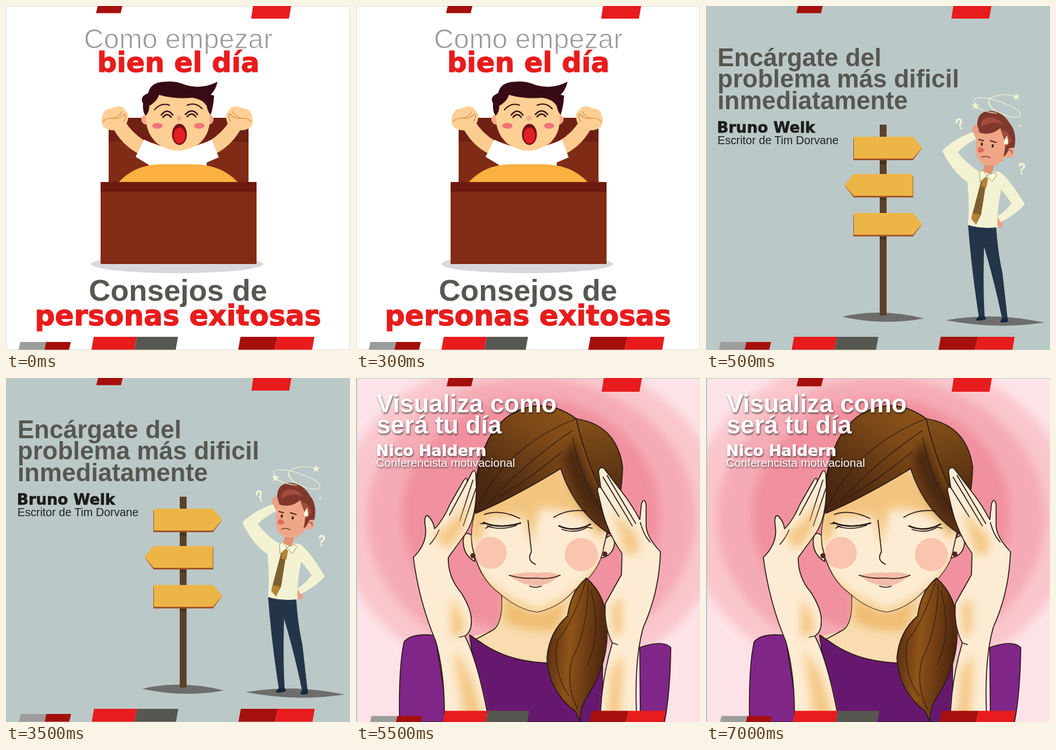
An HTML page for the animation above (8 s loop, 600x600 px).

```html
<!DOCTYPE html>
<html lang="es">
<head>
<meta charset="utf-8">
<title>Como empezar bien el día</title>
<style>
  html, body { margin: 0; width: 100%; height: 100%; overflow: hidden; }
  svg { display: block; width: 100vw; height: 100vh; }
  .scene { visibility: hidden; }
  .scene.on { visibility: visible; }
  text { font-family: "Liberation Sans", Arial, sans-serif; }
  .bold { font-weight: 700; font-size: 43.6px; }
  .black { font-family: "DejaVu Sans", sans-serif; font-weight: 700; stroke-width: .025em; }
  .mid { text-anchor: middle; }
  .line { fill: none; stroke-linecap: round; stroke-linejoin: round; }
  .ink { stroke: #2b1a16; stroke-width: 1.7; stroke-linejoin: round; stroke-linecap: round; }
  .shade { filter: drop-shadow(1px 2px 1.5px #0009); }
  .soft { filter: blur(8px); }
</style>
</head>
<body>
<svg viewBox="0 0 600 600">
  <defs>
    <g id="topTabs">
      <path fill="#a50f0c" d="M161-4H204L200 12.5H157Z"/>
      <path fill="#e81c1c" d="M431.5-4H498L493.500 22H427.500Z"/>
    </g>
    <g id="bottomTabs">
      <path fill="#9d9d9c" d="M25 586H70L67 599.500H22Z"/>
      <path fill="#a50f0c" d="M70 586H113L110 599.500H67Z"/>
      <path fill="#e81c1c" d="M153 577H228L224 599.500H149Z"/>
      <path fill="#575751" d="M228 577H300L296 599.500H224Z"/>
      <path fill="#a50f0c" d="M409 577H474L468 599.500H405Z"/>
      <path fill="#e81c1c" d="M474 577H538L534 599.500H468Z"/>
    </g>
    <g id="arrow">
      <path fill="#a4552b" d="M257 3H360L376 21 361 41H257Z"/>
      <path fill="#edb546" d="M258 0H361L377 19 361 38H258Z"/>
    </g>
    <path id="star" d="M0-7 1.700-2 7-2 2.700 1.200 4.300 6.500 0 3.400-4.300 6.500-2.700 1.200-7-2-1.700-2Z"/>
    <linearGradient id="bangs" x1=".9" y1="0" x2=".1" y2="1">
      <stop offset="0" stop-color="#93591b"/><stop offset=".35" stop-color="#7d4916"/><stop offset=".75" stop-color="#4d2a12"/><stop offset="1" stop-color="#432312"/>
    </linearGradient>
    <linearGradient id="crown" x2=".4" y2="1">
      <stop offset="0" stop-color="#8f581b"/><stop offset=".4" stop-color="#804d18"/><stop offset="1" stop-color="#48280f"/>
    </linearGradient>
    <linearGradient id="tail" x2="1" y2=".2">
      <stop offset="0" stop-color="#4c260f"/><stop offset=".45" stop-color="#8f5418"/><stop offset="1" stop-color="#4e260f"/>
    </linearGradient>
    <clipPath id="photo"><path d="M2 1H600V600H2Z"/></clipPath>
    <clipPath id="face"><path d="M213 218Q197 264 203 295Q215 350 250 375Q283 404 316 408Q353 401 381 370Q426 338 432 295L440 260 357 145Z"/></clipPath>
  </defs>

  <!-- Waking up -->
  <g class="scene">
    <path fill="#fff" stroke="#dcdcdc" d="M.5.5H599.500V599.500H.5Z"/>
    <use href="#topTabs"/><use href="#bottomTabs"/>
    <text class="mid" x="300.500" y="74" font-size="48.200" fill="#999" stroke="#fff" stroke-width="1.100">Como empezar</text>
    <text class="mid black" x="300.500" y="115" font-size="48" fill="#e81c1c" stroke="#e81c1c">bien el día</text>

    <ellipse cx="298.500" cy="450" rx="150" ry="16" fill="#d8d8dc"/>
    <path fill="#802b15" d="M179 195H423V307H179Z"/>
    <path fill="#702013" d="M179 195H423V237H179Z"/>
    <g id="arm">
      <path fill="#fccb90" d="M186 212 207 200Q219 221 242 235L230 257Q202 242 186 212Z"/>
      <path fill="#fdcf94" d="M171 185Q174 179 182 179L195 175Q205 175 207 181Q215 187 213 196Q211 211 195 216Q180 219 170 211Q163 199 171 185Z"/>
      <path class="line" stroke="#d99252" stroke-width="1.300" d="M169 202Q176 194 187 196T207 188M187 196Q198 192 202 184M207 188Q211 194 205 201"/>
    </g>
    <use href="#arm" transform="matrix(-1 0 0 1 597 0)"/>
    <path fill="#fff" d="M241 233Q300 262 359 233L371 264 350 273V290H249V277L226 263Z"/>
    <path fill="#fbb040" d="M197 307Q225 276 272 276H326Q375 276 404 307Z"/>
    <circle cx="245" cy="198" r="9" fill="#f6a987"/><circle cx="353" cy="198" r="9" fill="#f6a987"/>
    <path fill="#fdcf94" d="M244 190Q244 145 300 144T355 190Q358 222 337 240Q300 265 264 240Q243 222 244 190Z"/>
    <path fill="#380b14" d="M244 191Q238 187 239 170Q232 158 248 152Q252 132 279 132Q294 130 314 138Q342 146 369 132Q366 146 357 155L363 156Q362 174 357 190Q352 185 350 174Q342 162 325 160Q295 163 267 155Q263 167 250 174Q250 185 244 191Z"/>
    <g class="line" stroke="#380b14">
      <path stroke-width="2" d="M259 181Q270 168 285 173M316 173Q331 167 342 179"/>
      <path stroke-width="2.600" d="M271 190Q281 177 291 190M274 194Q281 185 288 194M313 189Q324 177 334 189M316 193Q324 184 331 193"/>
    </g>
    <circle cx="302" cy="196" r="4" fill="#f6a987"/>
    <ellipse cx="264" cy="209" rx="9" ry="5" fill="#f1737a"/><ellipse cx="337" cy="209" rx="9" ry="5" fill="#f1737a"/>
    <ellipse cx="302.500" cy="224" rx="13" ry="18.500" fill="#74121c"/>
    <ellipse cx="302.500" cy="226" rx="10" ry="14" fill="#e11f25"/>
    <path fill="#832b15" d="M165 307H437V450H165Z"/>
    <path fill="#6d1b10" d="M165 307H437V324H165Z"/>

    <text class="mid" x="300" y="514" font-size="52.300" font-weight="700" fill="#575751">Consejos de</text>
    <text class="mid black" x="300" y="557" font-size="49" fill="#e81c1c" stroke="#e81c1c">personas exitosas</text>
  </g>

  <!-- Hard problem first -->
  <g class="scene">
    <path fill="#bbc8c8" d="M0 0H600V600H0Z"/>
    <use href="#topTabs" x=".5"/><use href="#bottomTabs" x=".5"/>
    <g class="bold" fill="#575751">
      <text x="20" y="105">Encárgate del</text>
      <text x="20" y="142">problema más dificil</text>
      <text x="20" y="180">inmediatamente</text>
    </g>
    <text class="black" x="19" y="221" font-size="26.500" fill="#1d1d1b" stroke="#1d1d1b">Bruno Welk</text>
    <text x="20" y="241" font-size="19.700" fill="#222">Escritor de Tim Dorvane</text>

    <path fill="#6d6e6c" d="M238 542Q305 526 380 545Q310 558 238 542ZM418 548Q500 533 590 552Q510 565 418 548Z"/>
    <path fill="#5b4128" d="M303 207H315V540H303Z"/>
    <path fill="#493320" d="M303 269H315V276H303ZM303 333H315V339H303ZM303 401H315V407H303Z"/>
    <use href="#arrow" y="228"/>
    <use href="#arrow" transform="matrix(-1 0 0 1 618.500 293)"/>
    <use href="#arrow" y="361"/>

    <path fill="#253549" d="M457 381 506 384Q509 430 517 465L526 545 517 548Q503 480 485 420Q483 490 486 542L476 543Q463 460 457 381Z"/>
    <path fill="#18263b" d="M476 541H486L489 546Q480 550 470 548ZM516 545 526 543 527 550Q520 554 513 551Z"/>
    <path fill="#e8a183" d="M465 227Q461 208 472 206L481 215 473 231ZM503 367Q513 365 517 373L518 385 511 387Z"/>
    <path fill="#f3f2d2" d="M466 220 471 232Q450 243 439 255Q455 275 475 288L512 289Q530 302 556 346Q540 364 514 377L508 367Q524 357 533 344L515 320Q508 350 508 386Q480 389 457 382Q460 345 456 307Q430 290 412 252Q435 230 466 220Z"/>
    <path fill="#e48f72" d="M487 270 503 276 498 295 484 288Z"/>
    <path fill="#efa686" d="M477 214Q469 235 471 255Q473 274 490 278Q512 280 523 263Q536 268 538 254Q538 246 530 247L533 220 500 208Z"/>
    <path fill="#81382c" d="M473 207Q473 185 493 183Q517 182 530 205Q543 220 538 247L529 248Q524 261 519 262Q523 243 523 230L513 213Q498 227 477 221Z"/>
    <path fill="#a24c3b" d="M480 202Q497 184 520 207Q500 198 480 211ZM514 217Q528 216 533 236L525 245Z"/>
    <path fill="#fffbe4" d="M525 226Q517 239 521 241Q528 244 527 235Z"/>
    <path fill="#d96f5c" d="M475 247Q481 244 486 252Q481 258 474 254Z"/>
    <path class="line" stroke="#51251f" stroke-width="2" d="M476 233 484 235M496 235 506 238"/>
    <ellipse cx="481" cy="241" rx="1.800" ry="3" fill="#382522"/><ellipse cx="500" cy="244" rx="1.800" ry="3" fill="#382522"/>
    <path class="line" stroke="#7a3930" stroke-width="1.300" d="M480 264Q488 260 496 265M529 252Q534 251 534 257"/>
    <path fill="#7d602f" d="M482 297 490 299 480 363 471 381 463 369Z"/>
    <path fill="#b38337" d="M482 297 492 301 489 317 480 315ZM465 361 478 364 471 381 463 372Z"/>
    <path fill="#f8f7df" stroke="#a79857" d="M483 286 490 296 478 307 477 290ZM503 290 490 296 499 306 507 295Z"/>
    <g class="line" stroke="#f3f2d2">
      <path stroke-width="1.200" d="M470 174C458 158 480 156 510 166S553 186 546 192Q530 199 500 179Q485 164 504 157Q523 152 541 158M470 174Q482 185 507 187M504 157Q482 166 502 181"/>
      <path id="ask" stroke-width="3.500" d="M547 279C547 274 555 274 555 279C555 283 550 283 550 287M550 291.500V292"/>
    </g>
    <use href="#ask" class="line" stroke="#f3f2d2" transform="rotate(-22 443 206)translate(-108 -78)"/>
    <g fill="#f3f2d2">
      <use href="#star" x="470" y="174"/><use href="#star" x="541" y="158"/>
      <use href="#star" transform="translate(548 209)scale(.4)"/>
    </g>
  </g>

  <!-- Picture the day -->
  <g class="scene">
    <path fill="#bbc8c8" d="M0 0H600V600H0Z"/>
    <g clip-path="url(#photo)">
      <path fill="#fde3e8" d="M0 0H600V600H0Z"/>
      <g class="soft">
        <ellipse cx="305" cy="245" rx="338" ry="285" fill="#f9c6cc"/>
        <ellipse cx="305" cy="245" rx="286" ry="245" fill="#f5abb5"/>
        <ellipse cx="305" cy="240" rx="225" ry="205" fill="#f1919f"/>
      </g>

      <path class="ink" fill="url(#crown)" d="M208 250Q199 120 265 67Q325 28 384 71Q455 82 465 155Q464 220 437 276L320 210Z"/>
      <path fill="#f9dcb0" d="M254 360Q260 425 234 442L198 452 217 600H430V490L379 440 380 360Z"/>
      <path class="line ink" d="M254 378Q257 425 240 439L205 458"/>
      <path fill="#efbd72" class="soft" d="M256 376Q285 402 316 410L368 388 350 440Q300 445 258 425Z"/>
      <path class="ink" fill="#fce6c8" d="M207 279Q190 262 187 282Q186 308 207 320ZM430 285Q449 264 451 288Q449 309 428 314Z"/>
      <path class="ink" fill="#fdecd4" d="M213 218Q197 264 203 295Q215 350 250 375Q283 404 316 408Q353 401 381 370Q426 338 432 295L440 260 357 145Z"/>
      <g clip-path="url(#face)">
        <path class="soft" fill="#f2c57f" d="M200 225 350 150 400 215 440 260 425 285 400 245 360 230 320 228 306 290 293 240 230 244 215 285 200 290Z"/>
        <path class="soft" fill="#f6d193" d="M200 320Q235 372 316 402Q400 375 440 290V420H200Z"/>
      </g>
      <circle cx="235" cy="305" r="28" fill="#f9c5af"/><circle cx="393" cy="308" r="29" fill="#f9c5af"/>
      <path class="ink" fill="url(#bangs)" d="M384 71Q325 28 265 67Q205 110 209 236Q270 211 357 158Q381 232 442 272L448 240Q401 150 384 71Z"/>
      <path class="soft" fill="#4a2812" d="M362 140 382 105Q405 195 446 225L438 262Q388 228 362 140Z"/>
      <path class="line ink" opacity=".7" d="M384 71Q265 117 215 220M377 92Q290 151 235 215M360 128Q310 171 250 207M378 104Q393 188 442 249"/>
      <g class="line ink">
        <path d="M224 238Q250 228 286 245M345 243Q368 228 401 232"/>
        <path stroke-width="2.600" d="M222 252Q250 264 287 253M354 258Q381 270 409 255"/>
        <path d="M229 258Q252 267 280 257M359 264Q382 272 402 261M226 254 217 254M234 258 226 262M402 260 412 262M300 248 306 303Q297 318 313 325"/>
      </g>
      <path fill="#f5bda9" d="M267 344Q298 337 316 340Q337 336 356 344Q330 366 309 362Q286 360 267 344Z"/>
      <path class="line ink" d="M267 344Q290 351 314 349Q337 352 356 344M303 363Q313 367 323 363"/>
      <circle cx="204" cy="310" r="4.500" fill="#512324"/><circle cx="434" cy="307" r="4.500" fill="#512324"/>

      <g class="ink">
        <path fill="#812689" d="M76 600Q74 505 84 460Q98 444 138 449L162 600ZM496 600 495 470Q535 456 549 470Q548 550 538 600Z"/>
        <path fill="#66186f" d="M198 448 216 460Q262 494 334 497L430 500V600H220Z"/>
      </g>
      <path class="ink" fill="url(#tail)" d="M402 349Q375 371 369 415Q337 443 333 488Q335 545 383 582L391 600Q389 577 404 554Q440 500 438 437Q439 382 402 349Z"/>
      <path class="line ink" opacity=".65" d="M402 349Q382 420 351 459Q342 510 371 554M405 359Q404 440 377 490Q365 535 386 577M410 371Q430 445 403 500"/>

      <path class="ink" fill="#fdecd4" d="M154 600Q156 520 139 459Q110 390 100 313Q125 288 121 260Q118 239 125 240Q135 249 137 263Q152 248 164 220L187 180Q194 169 194 181L201 167Q206 156 209 167L210 194Q209 247 190 273L161 313Q160 347 183 374Q203 405 201 427Q201 443 190 450Q213 495 232 600Z"/>
      <path class="line ink" d="M194 181 163 239M204 178 181 249M209 193 187 258M180 452 190 450M145 265Q139 279 129 290"/>
      <path class="ink" fill="#fdecd4" d="M426 600Q427 530 447 462Q432 433 435 393L463 343 464 306Q441 274 430 233L421 196Q421 188 427 191L423 164Q424 154 432 157L464 199Q481 221 495 247L498 219Q503 207 506 221L506 258Q507 278 531 303Q529 373 501 435Q484 495 490 600Z"/>
      <path class="line ink" d="M427 191 459 242M431 173 482 258M438 170 488 254M447 462 456 465M496 252Q502 275 513 286"/>
      <g class="soft" fill="#f1bc6c" opacity=".75">
        <path d="M137 275Q174 248 197 210L185 270 158 300ZM165 385Q194 415 187 445L166 455ZM170 475Q207 510 222 600H190Z"/>
        <path d="M447 230 493 278 493 307 470 308ZM445 400 463 380 465 440 449 455ZM445 510 467 480 460 600H436Z"/>
      </g>
    </g>
    <use href="#topTabs" x="1" y="2"/><use href="#bottomTabs" x="2" y="3.500"/>
    <g class="shade" fill="#fff">
      <text class="bold" x="36" y="60">Visualiza como</text>
      <text class="bold" x="36" y="97">será tu día</text>
      <text class="black" x="35" y="136" font-size="26.500" stroke="#fff">Nico Haldern</text>
      <text x="35" y="154.500" font-size="20.200">Conferencista motivacional</text>
    </g>
  </g>
</svg>
<script>
  const LOOP = 8000;
  const starts = [0, 500, 5500];
  const scenes = document.querySelectorAll('.scene');

  function draw() {
    const time = performance.now() % LOOP;
    const current = starts.findLastIndex(start => time >= start);
    scenes.forEach((scene, i) => scene.classList.toggle('on', i === current));
    requestAnimationFrame(draw);
  }
  draw();
</script>
</body>
</html>
```
